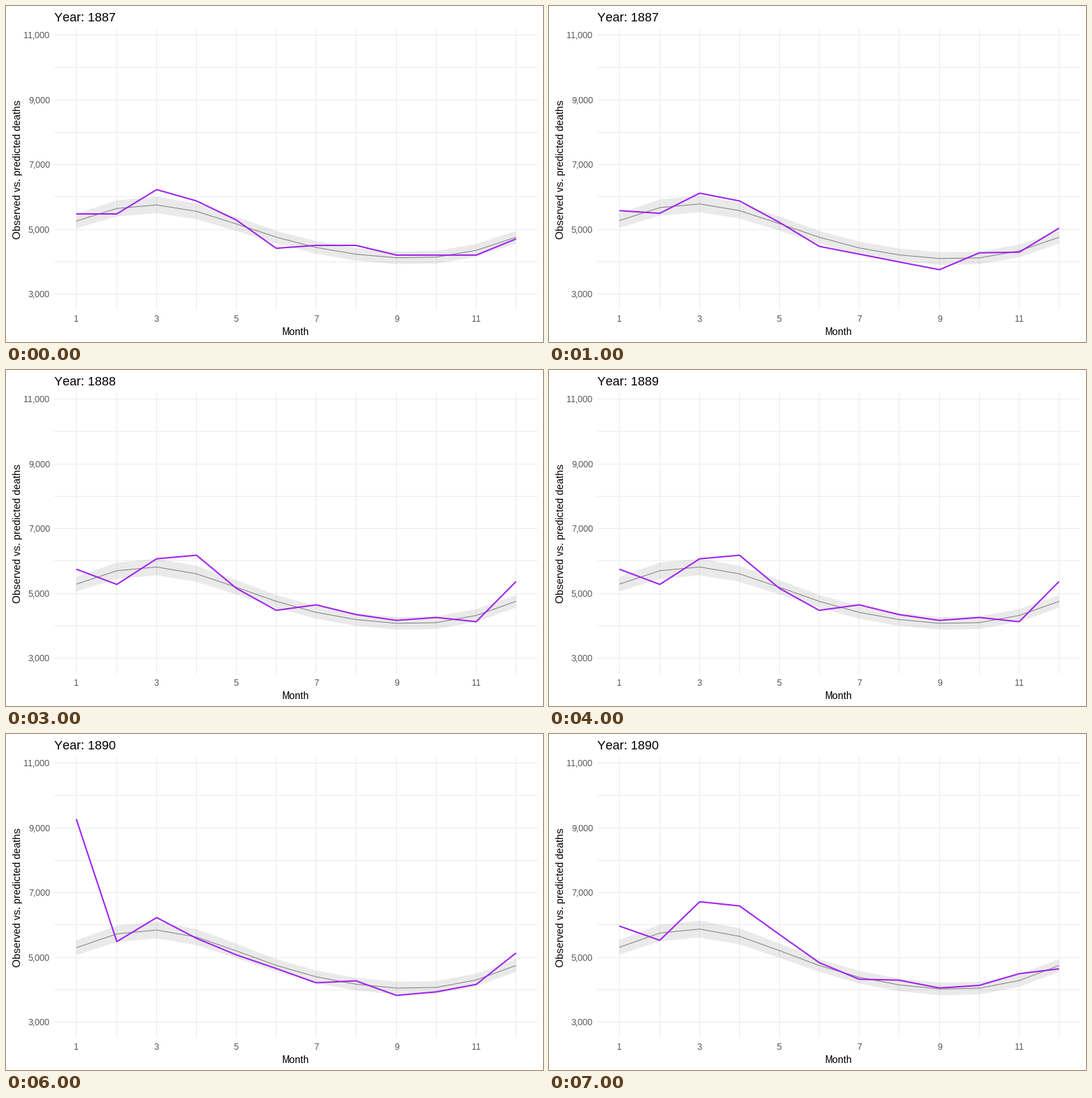
Write a matplotlib script that moves like this. It is 768x480 px and loops after 8000 ms.

```python
import numpy as np
import matplotlib.pyplot as plt
from matplotlib.animation import FuncAnimation
from matplotlib.patches import Polygon

plt.rcParams.update({
    "font.family": "Liberation Sans",
    "text.hinting": "native",
    "text.hinting_factor": 1,
    "text.kerning_factor": 6,
})

W, H, DPI = 768, 480, 96
PX = 72 / DPI  # points per pixel
GRID, TICK = "#EBEBEB", "#4D4D4D"
FIRST_YEAR = 1887
MONTHS = np.arange(1, 13)

# Monthly deaths in tens, one row per year
OBSERVED = 10 * np.array([
    [547, 547, 622, 587, 528, 441, 450, 450, 420, 420, 420, 470],
    [557, 549, 611, 587, 521, 447, 423, 399, 375, 427, 429, 503],
    [574, 527, 606, 617, 515, 447, 464, 434, 416, 425, 412, 536],
    [926, 548, 622, 558, 507, 465, 421, 427, 382, 393, 416, 513],
    [596, 552, 671, 658, 570, 483, 432, 429, 405, 413, 449, 464],
])


def stage_x(month):
    return np.round(100.5 + 57.13 * (month - 1)) + 0.5


def stage_y(deaths):
    return 318.8 - (deaths - 5000) / 21.59


def predict(k):
    """Yearly and half-yearly waves whose swing grows each year."""
    swing = 815 + 27 * k
    yearly = np.cos(2 * np.pi * (MONTHS - 3) / 12)
    half_yearly = np.cos(2 * np.pi * (MONTHS - 2.5) / 6)
    return 4843 + swing * (yearly + 0.127 * half_yearly)


def margin(deaths):
    return 195 + 0.06 * np.maximum(0, deaths - 4760)


fig = plt.figure(figsize=(W / DPI, H / DPI), dpi=DPI, facecolor="white")
ax = fig.add_axes([0, 0, 1, 1])
ax.set(xlim=(0, W), ylim=(H, 0))
ax.axis("off")


def line(xs, ys, color, width, z):
    return ax.plot(xs, ys, color=color, lw=width * PX, zorder=z, snap=False,
                   solid_capstyle="butt", solid_joinstyle="round")[0]


def label(x, y, text, size, color="black", **kw):
    return ax.text(x, y, text, fontsize=size * PX, color=color,
                   va="baseline", **kw)


for month in MONTHS:
    x = stage_x(month)
    line([x, x], [32, 434], GRID, 1, 1)
    if month % 2:
        label(x, 451, str(month), 12, TICK, ha="center")

for deaths in range(3000, 12000, 1000):
    y = np.round(stage_y(deaths))
    line([69, 760], [y + 0.5] * 2, GRID, 1, 1)
    if deaths % 2000:
        label(63, y + 5, f"{deaths:,}", 12, TICK, ha="right")

label(414.5, 470, "Month", 15, ha="center")
label(21, 233.5, "Observed vs. predicted deaths", 15, ha="center",
      rotation=90, rotation_mode="anchor")
title = label(69, 22, "", 18, ha="left")

xs = stage_x(MONTHS)
band = ax.add_patch(Polygon(np.zeros((3, 2)), closed=True, facecolor="#333333",
                            alpha=0.1, edgecolor="none", lw=0, zorder=2))
predicted = line(xs, xs, "#7F7F7F", 1, 3)
observed = line(xs, xs, "#A020F0", 2, 4)


def update(step):
    # The curves switch one step ahead of the title
    k = (step + 1) // 2
    title.set_text(f"Year: {FIRST_YEAR + step // 2}")
    mid = predict(k)
    edge = np.r_[mid + margin(mid), (mid - margin(mid))[::-1]]
    band.set_xy(np.column_stack([np.r_[xs, xs[::-1]], stage_y(edge)]))
    predicted.set_ydata(stage_y(mid))
    observed.set_ydata(stage_y(OBSERVED[k]))
    return title, band, predicted, observed


anim = FuncAnimation(fig, update, frames=8, interval=1000, repeat=True,
                     repeat_delay=0, blit=False)
plt.show()
```
